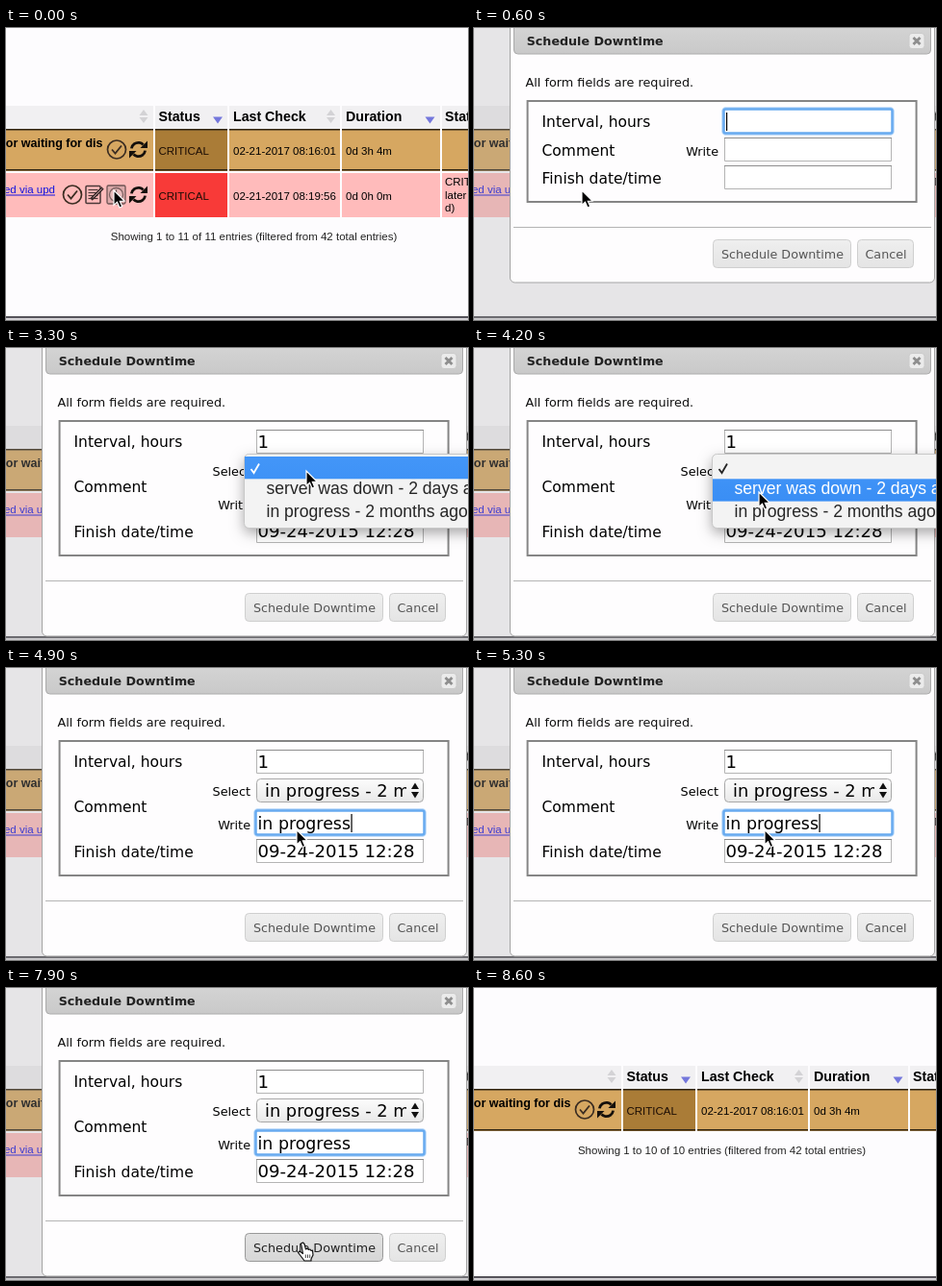
Animation, 480 px wide and 304 px high, one loop 8700 ms. Source, as an HTML page with a canvas:

```html
<!DOCTYPE html>
<html lang="en">
<head>
<meta charset="utf-8">
<title>Schedule downtime</title>
<style>
html, body { margin: 0; width: 100%; height: 100%; overflow: hidden; background: #fdfcfe; }
canvas { display: block; }
</style>
</head>
<body>
<canvas id="stage" width="480" height="304"></canvas>
<script>
const ctx = document.getElementById('stage').getContext('2d');
const LOOP = 8700, STEP = 100;
const ARIAL = '"Liberation Sans", sans-serif', VERDANA = '"DejaVu Sans", sans-serif';

// Moments at which the interface changes, in ms
const AT = { open: 400, grow: 800, type: 2200, menu: 3100, pick: 4800, close: 8300 };

// Pointer path: time, x, y
const PATH = [[0, 112, 169], [1000, 112, 169], [1700, 285, 104], [2300, 285, 104], [2900, 312, 128],
  [3500, 312, 128], [4200, 296, 150], [4700, 302, 168.5], [5600, 302, 168.5], [6500, 308, 266], [8700, 308, 266]];

function rect(x, y, w, h, fill) {
  ctx.fillStyle = fill;
  ctx.fillRect(x, y, w, h);
}

function paint(fill, stroke, width = 1) {
  if (fill) { ctx.fillStyle = fill; ctx.fill(); }
  if (stroke) { ctx.strokeStyle = stroke; ctx.lineWidth = width; ctx.stroke(); }
}

function box(x, y, w, h, radius, fill, stroke, width) {
  ctx.beginPath();
  ctx.roundRect(x, y, w, h, radius);
  paint(fill, stroke, width);
}

function text(str, x, y, size, family, color = '#000', weight = '', align = 'left') {
  ctx.font = `${weight} ${size}px ${family}`;
  ctx.textAlign = align;
  ctx.fillStyle = color;
  ctx.fillText(str, x, y);
}

function poly(points, fill, stroke, width) {
  ctx.beginPath();
  points.forEach(([x, y]) => ctx.lineTo(x, y));
  ctx.closePath();
  paint(fill, stroke, width);
}

function line(points, color, width) {
  ctx.beginPath();
  points.forEach(([x, y]) => ctx.lineTo(x, y));
  paint(null, color, width);
}

function circle(x, y, r, fill, stroke, width) {
  box(x - r, y - r, 2 * r, 2 * r, r, fill, stroke, width);
}

// dir is 1 for a triangle pointing down, -1 for up
function triangle(x, y, w, h, dir, fill) {
  poly([[x - w, y], [x + w, y], [x, y + dir * h]], fill);
}

function gradient(y0, y1, from, to) {
  const g = ctx.createLinearGradient(0, y0, 0, y1);
  g.addColorStop(0, from);
  g.addColorStop(1, to);
  return g;
}

const icons = {
  check(x, y) {
    circle(x, y, 9.5, null, '#3b2d22', 1.7);
    line([[x - 5, y], [x - 1.5, y + 4], [x + 5, y - 4]], '#3b2d22', 1.8);
  },
  refresh(x, y) {
    for (const side of [0, Math.PI]) {
      ctx.save();
      ctx.translate(x, y);
      ctx.rotate(side);
      ctx.beginPath();
      ctx.arc(0, 0, 7.2, Math.PI * 1.05, Math.PI * 1.75);
      paint(null, '#15100c', 2.8);
      poly([[9.5, -9], [9.5, -1.5], [2, -1.5]], '#15100c');
      ctx.restore();
    }
  },
  note(x, y) {
    box(x - 8.5, y - 9, 15, 18, 1, null, '#4a3838', 1.5);
    for (let i = -5; i < 7; i += 3) line([[x - 6, y + i], [x + 4, y + i]], '#4a3838', 1.2);
    line([[x - 3, y + 5], [x + 9, y - 7]], '#3a2c2c', 3.4);
    line([[x - 1, y + 3], [x + 8, y - 6]], '#c9a0a0', 1);
  },
  clock(x, y) {
    box(x - 9.5, y - 9.5, 19, 19, 1.5, '#dcaaaa', '#6d5454', 1.3);
    circle(x, y, 7, '#e8bcbc', '#7c6060', 1.3);
    line([[x, y - 5], [x, y], [x + 4, y + 2]], '#5d4646', 1.3);
  }
};

const CELLS = [[-2, 153], [155, 230], [232, 347], [349, 451], [453, 482]];

function tableRow(y, h, fill, statusFill, lastCheck, duration) {
  CELLS.forEach(([a, b], i) => rect(a, y, b - a, h, i === 1 ? statusFill : fill));
  const baseline = y + h / 2 + 4.5;
  text('CRITICAL', 158.5, baseline, 11.5, ARIAL, '#1c0d05');
  text(lastCheck, 236, baseline, 11.5, ARIAL);
  text(duration, 353, baseline, 11.5, ARIAL);
}

function drawPage(entries) {
  rect(0, 0, 480, 304, '#fdfcfe');
  CELLS.forEach(([a, b]) => rect(a, 81, b - a, 24, '#f1f0f2'));
  [['Status', 158.5], ['Last Check', 236], ['Duration', 353], ['Stat', 456]].forEach(([label, x]) =>
    text(label, x, 96.5, 14.2, ARIAL, '#000', 'bold'));
  for (const x of [143, 337.5]) {
    triangle(x, 91, 4.5, 6, -1, '#d3d2d5');
    triangle(x, 93, 4.5, 6, 1, '#d3d2d5');
  }
  for (const x of [220, 440.5]) triangle(x, 92.5, 5, 7, 1, '#7477dc');

  tableRow(105, 44, '#d6a761', '#aa7c37', '02-21-2017 08:16:01', '0d 3h 4m');
  for (const [a, b] of CELLS) {
    rect(a, 105, b - a, 1.5, '#2e2310');
    rect(a, 147, b - a, 1.5, '#2e2310');
  }
  text('or waiting for dis', 100.5, 123.5, 12.5, ARIAL, '#000', 'bold', 'right');
  icons.check(115, 126.5);
  icons.refresh(137.5, 126.5);

  if (entries === 11) {
    tableRow(151, 46, '#ffbbbb', '#f83a38', '02-21-2017 08:19:56', '0d 0h 0m');
    text('ed via upd', 51, 172, 11.5, ARIAL, '#1212e0', '', 'right');
    rect(0, 173.5, 51, 1, '#1212e0');
    icons.check(69, 173.5);
    icons.note(91.5, 173.5);
    icons.clock(114.5, 173.5);
    icons.refresh(137.5, 173.5);
    ['CRIT', 'later', 'd)'].forEach((s, i) => text(s, 456, 164 + 13.7 * i, 11.5, ARIAL));
  }
  text(`Showing 1 to ${entries} of ${entries} entries (filtered from 42 total entries)`,
    257.5, entries === 11 ? 220.5 : 172.5, 11.5, ARIAL, '#222', '', 'center');
  rect(0, 300, 480, 2, '#55535a');
  rect(0, 302, 480, 2, '#d4d2d6');
}

function input(y, value, focused, caretOn, size = 18.1) {
  if (focused) {
    box(259.5, y - 0.5, 175, 25, 2, '#fff', '#b5d6f9', 4.5);
    box(259.5, y - 0.5, 175, 25, 2, '#fff', '#68abf0', 2.5);
  } else {
    box(260.5, y + 0.5, 173, 24, 0, '#fff', '#b4b4b4');
    rect(260, y, 174, 1, '#8e8e8e');
  }
  text(value, 261.5, y + 19, size, VERDANA);
  if (focused && caretOn) rect(262 + (value ? ctx.measureText(value).width : 0), y + 3, 1.2, 19, '#000');
}

function selectBox(y, value) {
  box(260.5, y + 0.5, 173, 24, 4, gradient(y, y + 25, '#fdfdfd', '#e8e8e8'), '#a8a8a8');
  ctx.save();
  ctx.beginPath();
  ctx.rect(262, y, 154, 25);
  ctx.clip();
  text(value, 269, y + 19, 17.8, VERDANA);
  ctx.restore();
  triangle(425, y + 11, 4, 6.5, -1, '#111');
  triangle(425, y + 14, 4, 6.5, 1, '#111');
}

function button(label, x, y, w, active) {
  const fill = active ? gradient(y, y + 30, '#e2e2e2', '#d6d6d6') : gradient(y, y + 30, '#efefef', '#e4e4e4');
  box(x + 0.5, y + 0.5, w - 1, 29, 4, fill, active ? '#999' : '#cfcfcf');
  text(label, x + w / 2 + 0.5, y + 20, 12.7, VERDANA, active ? '#212121' : '#555', '', 'center');
}

function drawDialog(t, pointer) {
  const full = t >= AT.grow, shift = full ? 35 : 0;
  const typed = t >= AT.type, picked = t >= AT.pick;
  const label = (s, y) => text(s, 70.5, y, 15.5, VERDANA);
  const hint = (s, y) => text(s, 254, y, 12.8, VERDANA, '#000', '', 'right');
  const caretOn = start => (t - start) % 1060 < 530;

  rect(0, 0, 480, 304, 'rgba(170,170,170,.28)');
  box(37.5, -10, 441, 275 + shift, 5, '#fefdfe', '#a4a4a4');
  box(41.5, -8, 433, 35, 4, gradient(-8, 27, '#d6d6d6', '#c9c9c9'), '#aaa');
  text('Schedule Downtime', 54.7, 18, 12.7, VERDANA, '#222', 'bold');
  box(452, 5.5, 16, 16, 3, '#ebebeb', '#cacaca');
  line([[456.5, 10], [463.5, 17]], '#8e8e8e', 2.8);
  line([[463.5, 10], [456.5, 17]], '#8e8e8e', 2.8);

  text('All form fields are required.', 53.5, 61, 12.8, VERDANA, '#111');
  box(55.6, 76, 404, 105 + shift, 0, null, '#858585', 2);
  label('Interval, hours', 103);
  label('Comment', full ? 150 : 133);
  label('Finish date/time', 162 + shift);
  hint('Write', 133 + shift);

  input(85, typed ? '1' : '', t < AT.menu, caretOn(typed ? AT.type : 500));
  input(full ? 149 : 114, picked ? 'in progress' : '', picked, caretOn(4900), 17.4);
  input(143 + shift, full ? `09-24-2015 ${typed ? 12 : 11}:28` : '', false);
  if (full) {
    hint('Select', 133);
    selectBox(115, picked ? 'in progress - 2 months ago' : '');
  }

  rect(41, 207 + shift, 434, 1, '#b4b4b4');
  button('Schedule Downtime', 248, 220 + shift, 144, pointer.y > 250);
  button('Cancel', 398, 220 + shift, 59, false);
  if (t >= AT.menu && !picked) drawMenu(pointer.y);
}

function drawMenu(pointerY) {
  const active = pointerY < 136 ? 0 : pointerY < 159 ? 1 : 2;
  ctx.save();
  ctx.shadowColor = 'rgba(0,0,0,.35)';
  ctx.shadowBlur = 14;
  ctx.shadowOffsetY = 5;
  box(247.5, 110.5, 260, 77, 5, '#f3f3f3');
  ctx.restore();
  box(247.5, 110.5, 260, 77, 5, null, '#c8c8c8');
  rect(248, 113 + 23.3 * active, 240, 23.3, gradient(113, 183, '#4396f8', '#358af3'));
  const color = row => row === active ? '#fff' : '#262626';
  line([[254.5, 126], [257.5, 130], [263, 120.5]], color(0), 1.8);
  text('server was down - 2 days ago', 270.5, 152.3, 17.6, ARIAL, color(1));
  text('in progress - 2 months ago', 270.5, 176, 17.6, ARIAL, color(2));
}

function pointerAt(t) {
  const i = PATH.findIndex(p => p[0] > t);
  const [t0, x0, y0] = PATH[i - 1], [t1, x1, y1] = PATH[i];
  const u = (t - t0) / (t1 - t0), ease = u * u * (3 - 2 * u);
  return { x: x0 + (x1 - x0) * ease, y: y0 + (y1 - y0) * ease };
}

function drawArrow() {
  poly([[0, 0], [0, 15.5], [3.5, 12.3], [6, 18], [8.7, 16.8], [6.3, 11.3], [11, 11]], '#000', '#fff', 1.2);
}

function drawBeam() {
  for (const [color, width] of [['#fff', 3], ['#222', 1.4]]) {
    line([[-3.5, -7.5], [-1, -7], [0, -5.5], [0, 6.5], [-1, 8], [-3.5, 8.5]], color, width);
    line([[3.5, -7.5], [1, -7], [0, -5.5], [0, 6.5], [1, 8], [3.5, 8.5]], color, width);
    line([[-2, 3.5], [2, 3.5]], color, width);
  }
}

function drawHand() {
  ctx.lineJoin = 'round';
  poly([[-1.5, 0], [0.5, -1], [2, 0.5], [3.5, 6], [5, 5], [6.5, 6.5], [8, 6], [9, 7.5], [10.5, 7.2],
    [11, 12], [9, 16], [9, 18], [2, 18], [-1, 14], [-4.5, 9.5], [-3, 8], [0.5, 10.5]], '#fff', '#111', 1.2);
  for (const x of [3.3, 5.5, 7.7]) line([[x, 11.5], [x, 15]], '#333', 0.9);
  ctx.lineJoin = 'miter';
}

function drawPointer({ x, y }, t) {
  const overField = t >= AT.grow && x > 260 && y < 110;
  ctx.save();
  ctx.translate(x, y);
  if (y > 254) drawHand();
  else if (overField) drawBeam();
  else drawArrow();
  ctx.restore();
}

function draw(now) {
  const t = Math.floor(now % LOOP / STEP) * STEP;
  const pointer = pointerAt(t), closed = t >= AT.close;
  drawPage(closed ? 10 : 11);
  if (t >= AT.open && !closed) drawDialog(t, pointer);
  if (!closed) drawPointer(pointer, t);
}

const start = performance.now();
(function frame() {
  draw(performance.now() - start);
  requestAnimationFrame(frame);
})();
</script>
</body>
</html>
```
